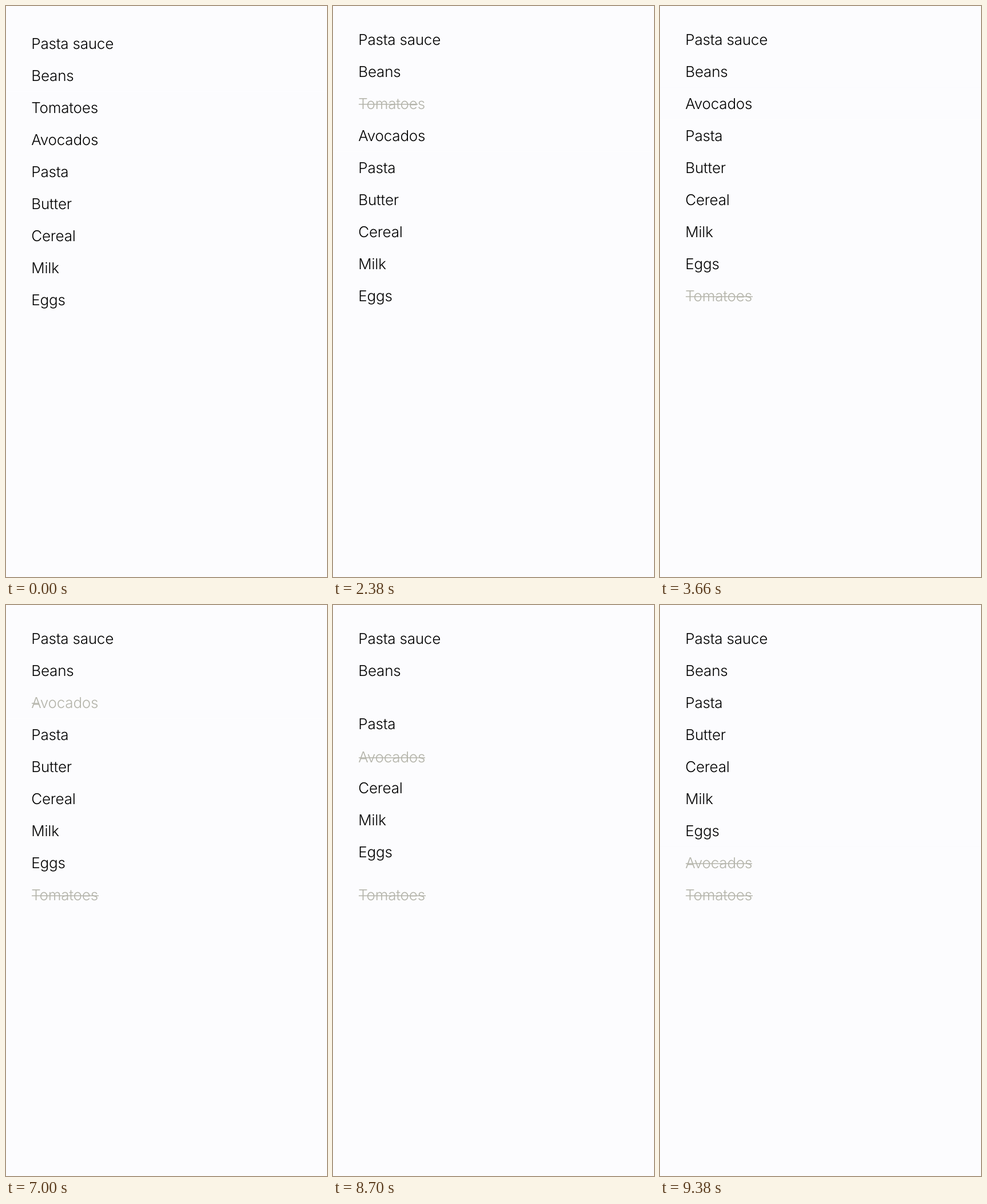
Write an HTML page that moves like this. It is 561 px wide and 998 px high and loops after 9.4 s.

```html
<!DOCTYPE html>
<html lang="en">
<head>
<meta charset="utf-8">
<title>Shopping list</title>
<style>
  html, body { margin: 0; width: 100%; height: 100%; overflow: hidden; background: #fcfcfe; }
  svg { display: block; width: 561px; height: 998px; }
  text {
    font: 300 26px Inter, "Open Sans", sans-serif;
    font-optical-sizing: none;
    letter-spacing: -0.22px;
    text-rendering: geometricPrecision;
    fill: #000;
  }
  rect { fill: #fcfcfe; }
  line { stroke: #b4b4aa; stroke-width: 1.5; }
  .done text { fill: #b4b4aa; }
</style>
</head>
<body>
<svg id="stage" viewBox="0 0 561 998"></svg>
<script>
const LOOP = 9400, PITCH = 56.06, TOP = 67.5, LEFT = 44.3;
const ITEMS = ["Pasta sauce", "Beans", "Tomatoes", "Avocados", "Pasta", "Butter", "Cereal", "Milk", "Eggs"];

// The list settles upwards one device pixel at a time.
const SETTLE = [20, 60, 120, 160, 220, 280, 340, 420, 560, 700];
const SETTLE_STEP = 0.748;

// Each swipe: strike line ends by time, then the row drops to a later slot.
const SWIPES = [
  { name: "Tomatoes", strike: [[1700, 58], [1780, 92], [1880, 130], [1960, 148], [2800, 162]], start: 2814, to: 8 },
  { name: "Avocados", strike: [[7000, 57], [7120, 92], [7200, 130], [7280, 148], [8420, 161]], start: 8396, to: 7 }
];
const MOVE = 860;

const stage = document.getElementById("stage");

function add(parent, tag, attrs = {}) {
  const node = document.createElementNS("http://www.w3.org/2000/svg", tag);
  for (const key in attrs) node.setAttribute(key, attrs[key]);
  return parent.appendChild(node);
}

const rows = ITEMS.map((name, slot) => {
  const group = add(stage, "g");
  const swipe = SWIPES.find(s => s.name === name);
  if (swipe) add(group, "rect", { x: 0, y: -37.5, width: 561, height: PITCH });
  add(group, "text", { x: LEFT, y: 0 }).textContent = name;
  const line = swipe && add(group, "line", { x1: 45, x2: 45, y1: -7.8, y2: -7.8 });
  return { name, slot, group, swipe, line };
});

// Swiped rows pass over the others.
for (const name of ["Avocados", "Tomatoes"]) {
  stage.append(rows.find(r => r.name === name).group);
}

// Ease in and out, cubic-bezier(.42, 0, .4, 1)
function ease(x) {
  if (x <= 0) return 0;
  if (x >= 1) return 1;
  let lo = 0, hi = 1;
  for (let i = 0; i < 24; i++) {
    const u = (lo + hi) / 2, v = 1 - u;
    if (1.26 * u * v * v + 1.2 * u * u * v + u * u * u < x) lo = u; else hi = u;
  }
  return lo * lo * (3 - 2 * lo);
}

function slotsAt(t) {
  const slots = rows.map(r => r.slot);
  for (const swipe of SWIPES) {
    const p = ease((t - swipe.start) / MOVE);
    if (!p) continue;
    const mover = rows.findIndex(r => r.swipe === swipe);
    const from = slots[mover];
    rows.forEach((r, i) => {
      if (i === mover) slots[i] = from + (swipe.to - from) * p;
      else if (slots[i] > from && slots[i] <= swipe.to) slots[i] -= p;
    });
  }
  return slots;
}

function draw(t) {
  const shift = SETTLE.filter(s => s > t).length * SETTLE_STEP;
  const slots = slotsAt(t);
  rows.forEach((r, i) => {
    r.group.setAttribute("transform", `translate(0 ${(TOP + shift + slots[i] * PITCH).toFixed(3)})`);
    if (!r.swipe) return;
    const reached = r.swipe.strike.filter(s => s[0] <= t).pop();
    r.group.classList.toggle("done", !!reached);
    r.line.setAttribute("x2", reached ? reached[1] : 45);
  });
}

const begin = performance.now();
function tick() {
  draw((performance.now() - begin) % LOOP);
  requestAnimationFrame(tick);
}
tick();
</script>
</body>
</html>
```
